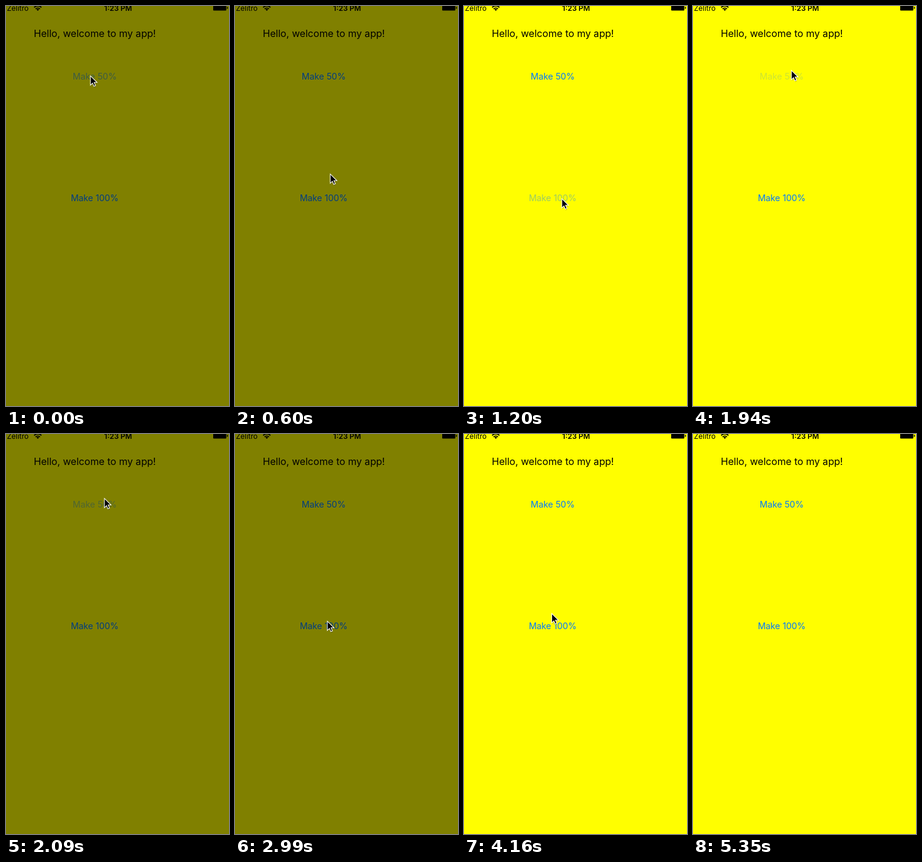
An HTML page that plays this animation: 367x658 px, repeating every 5800 ms.

```html
<!DOCTYPE html>
<html lang="en">
<head>
<meta charset="utf-8">
<title>Brightness demo</title>
<style>
  html, body { margin: 0; width: 100%; height: 100%; overflow: hidden; background: #fffe00; }
  svg { display: block; width: 367px; height: 658px; }
  text { font-family: Inter, "Noto Sans", sans-serif; }
  .status { font-size: 12px; }
  .button { font-size: 14.3px; text-anchor: middle; }
</style>
</head>
<body>
<svg viewBox="0 0 367 658">
  <rect id="screen" width="367" height="658"/>

  <text class="status" x="1.5" y="7.5">Zelitro</text>
  <g fill="none" stroke="#000" stroke-width="1.7">
    <path d="M46.3 2.3a8.6 8.6 0 0 1 12 0"/>
    <path d="M48.7 4.9a5.2 5.2 0 0 1 7.2 0"/>
    <path d="M52.3 8l-2.1-2.2a3 3 0 0 1 4.2 0z" fill="#000" stroke="none"/>
  </g>
  <text class="status" x="184.5" y="7.5" font-weight="600" text-anchor="middle">1:23 PM</text>
  <path d="M341 -3H362.5V6.5q0 1-1 1H342q-1 0-1-1zM363.6 1q1.8 .6 1.8 2t-1.8 2z"/>

  <text x="45.7" y="51" font-size="16.1">Hello, welcome to my app!</text>
  <text id="half" class="button" x="146" y="121">Make 50%</text>
  <text id="full" class="button" x="146" y="321">Make 100%</text>

  <g id="cursor">
    <g transform="scale(.95)">
      <path d="M0 1V17L3.7 13.6 6.1 19 8.8 17.8 6.4 12.4H11.5Z" opacity=".2" transform="translate(.5 1)"/>
      <path d="M0 0V16L3.7 12.6 6.1 18 8.8 16.8 6.4 11.4H11.5Z" stroke="#fff" stroke-width="1.1"/>
    </g>
  </g>
</svg>
<script>
  const LOOP = 5800;
  const TICK = 148.6; // the picture advances in steps of this many ms
  const FADE_TICKS = 3.2;

  // Cursor moves, timed in ticks
  const START = { x: 139, y: 115 };
  const MOVES = [
    { from: 2, to: 5, x: 163, y: 333 },
    { from: 5, to: 6, x: 161, y: 317 },
    { from: 8, to: 11, x: 162, y: 106 },
    { from: 15, to: 20, x: 152, y: 308 },
    { from: 25, to: 29, x: 143, y: 293 },
    { from: 30, to: 31, x: 351, y: 506 },
    { from: 33, to: 34, x: 351, y: 645 }
  ];

  const $ = id => document.getElementById(id);
  const [screen, half, full, cursor] = ["screen", "half", "full", "cursor"].map($);

  function ease(k) {
    const t = Math.min(1, Math.max(0, k));
    return t * t * (3 - 2 * t);
  }

  function cursorAt(tick) {
    return MOVES.reduce((p, m) => {
      const k = ease((tick - m.from) / (m.to - m.from));
      return { x: p.x + (m.x - p.x) * k, y: p.y + (m.y - p.y) * k };
    }, START);
  }

  // A pressed label drops to 20% and fades back in.
  function labelAlpha(tick, presses) {
    const last = Math.max(...presses.filter(p => p <= tick));
    return 0.2 + 0.8 * ease((tick - last) / FADE_TICKS);
  }

  function paintLabel(label, colour, alpha) {
    label.setAttribute("fill", colour);
    label.setAttribute("opacity", alpha);
  }

  function draw(time) {
    const tick = Math.floor(time / TICK);
    const dimmed = tick < 8 || (tick >= 14 && tick < 21);
    screen.setAttribute("fill", dimmed ? "#808000" : "#fffe00");

    const blue = dimmed ? "#003d80" : "#007aff";
    paintLabel(half, blue, labelAlpha(tick, [-1.4, 13]));
    paintLabel(full, blue, labelAlpha(tick, [-9, 7, 21]));

    // The cursor leaves the stage on the right and returns briefly in the corner.
    const visible = tick < 32 || (tick >= 34 && tick < 36);
    const { x, y } = cursorAt(tick);
    cursor.setAttribute("visibility", visible ? "visible" : "hidden");
    cursor.setAttribute("transform", `translate(${x} ${y})`);
  }

  function frame() {
    draw(performance.now() % LOOP);
    requestAnimationFrame(frame);
  }
  frame();
</script>
</body>
</html>
```
